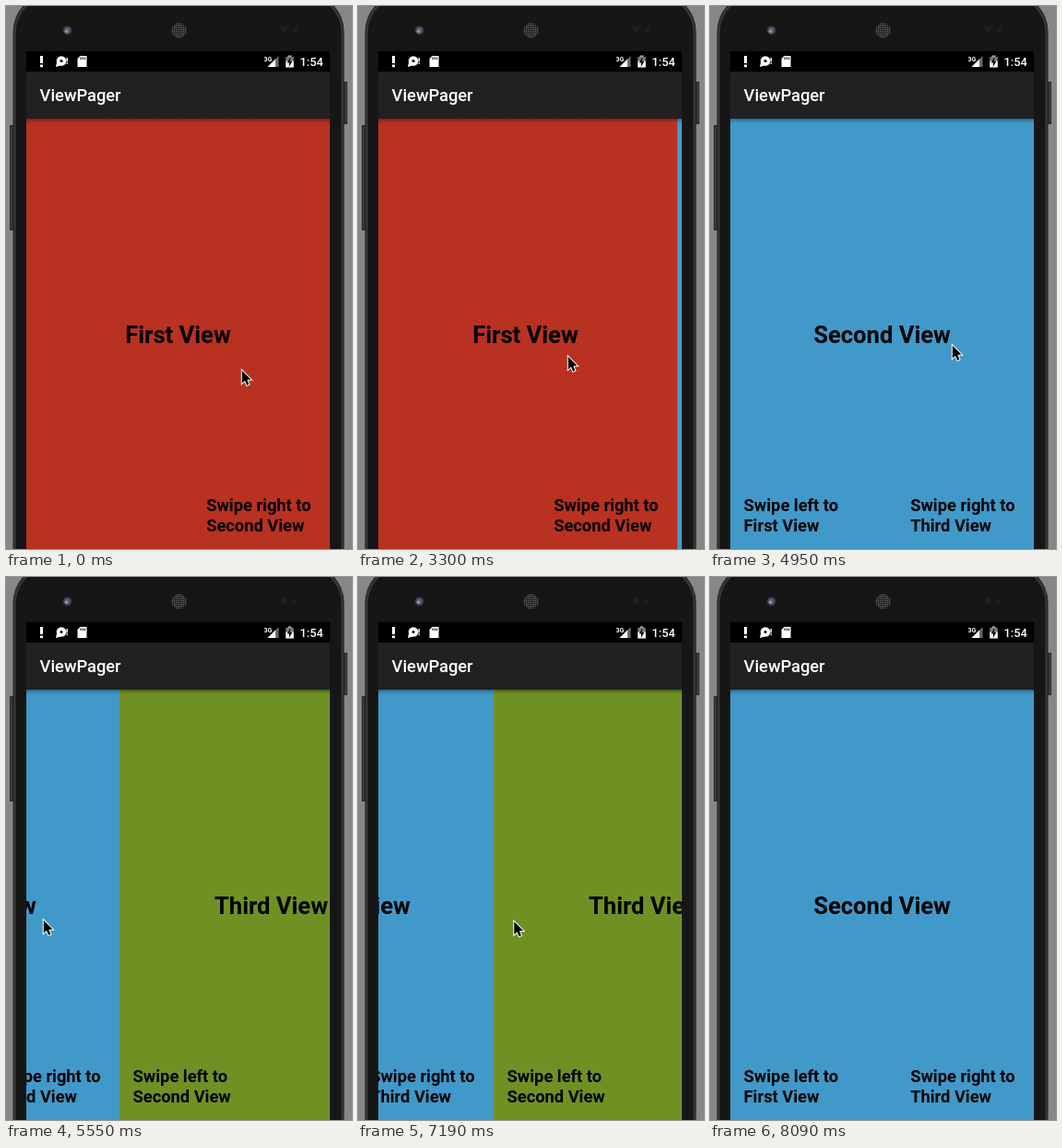
Recreate the animation shown at these times as an HTML page with a canvas. Size 375 by 588 pixels, loop 9.44 s.

```html
<!DOCTYPE html>
<html lang="en">
<head>
<meta charset="utf-8">
<title>ViewPager</title>
<style>
html, body { margin: 0; width: 100%; height: 100%; overflow: hidden; background: #878787; }
canvas { display: block; width: 375px; height: 588px; }
</style>
</head>
<body>
<canvas id="stage"></canvas>
<script>
const W = 375, H = 588, LOOP = 9440;
const SCREEN = { x: 22, y: 49, w: 329, top: 122 };
const canvas = document.getElementById('stage');
const ratio = window.devicePixelRatio || 1;
canvas.width = W * ratio;
canvas.height = H * ratio;
const c = canvas.getContext('2d');
c.scale(ratio, ratio);

const PAGES = [
  { color: '#b93121', title: 'First View', right: 'Second View' },
  { color: '#4199c9', title: 'Second View', left: 'First View', right: 'Third View' },
  { color: '#6f9124', title: 'Third View', left: 'Second View' }
];

// Pager drags, as [time, scroll]
const DRAG_1 = [[3150, 0], [3300, 5], [3624, 80]];
const DRAG_2 = [[4950, 329], [5100, 337], [5550, 557]];
const DRAG_3 = [[6890, 658], [7040, 640], [7397, 386]];

// Visible pointer strokes, as [time, x, y]; each ends at its own "until"
const STROKES = [
  { until: 2250, keys: [[1350, 255, 393], [2100, 70, 403]] },
  { until: 3600, keys: [[2550, 122, 378], [2700, 302, 378], [2850, 240, 378],
                        [3150, 234, 378], [3300, 227, 378], [3600, 157, 378]] },
  { until: 7490, keys: [[4350, 60, 376], [4650, 235, 368], [4800, 235, 368], [4950, 262, 366],
                        [5100, 254, 366], [5550, 40, 370], [6740, 40, 370],
                        [7040, 62, 371], [7340, 275, 372]] }
];

function track(keys, t, k = 1) {
  if (t <= keys[0][0]) return keys[0][k];
  for (let i = 1; i < keys.length; i++) {
    const a = keys[i - 1], b = keys[i];
    if (t <= b[0]) return a[k] + (b[k] - a[k]) * (t - a[0]) / (b[0] - a[0]);
  }
  return keys[keys.length - 1][k];
}

// Quintic deceleration: distance still to travel
function settle(t, start, distance) {
  return distance * Math.pow(Math.max(0, 1 - (t - start) / 955), 5);
}

function scrollAt(t) {
  if (t < 3624) return track(DRAG_1, t);
  if (t < 4950) return 329 - settle(t, 3624, 249);
  if (t < 5720) return track(DRAG_2, t);
  if (t < 6890) return 658 - settle(t, 5720, 101);
  if (t < 7397) return track(DRAG_3, t);
  return 329 + settle(t, 7397, 56.6);
}

function pointerAt(t) {
  if (t < 1500) return [255, 393];
  const s = STROKES.find(s => t >= s.keys[0][0] && t < s.until);
  return s && [track(s.keys, t, 1), track(s.keys, t, 2)];
}

// The picture advances every 150 ms, with one shorter beat before 6440
function beat(t) {
  const base = t < 6440 ? 0 : 6440;
  return base + Math.floor((t - base) / 150) * 150;
}

function rect(x, y, w, h, color) {
  c.fillStyle = color;
  c.fillRect(x, y, w, h);
}

function disc(x, y, r, color) {
  c.fillStyle = color;
  c.beginPath();
  c.arc(x, y, r, 0, Math.PI * 2);
  c.fill();
}

function poly(points, color) {
  c.fillStyle = color;
  c.beginPath();
  points.forEach(([x, y]) => c.lineTo(x, y));
  c.closePath();
  c.fill();
}

function rounded(x, y, w, h, r, color) {
  c.fillStyle = color;
  c.beginPath();
  c.roundRect(x, y, w, h, r);
  c.fill();
}

function text(s, x, y, size, weight = 700, color = '#000', align = 'left') {
  c.font = `${weight} ${size}px Roboto, sans-serif`;
  c.textAlign = align;
  c.fillStyle = color;
  c.fillText(s, x, y);
}

function drawPhone() {
  rect(0, 0, W, H, '#878787');
  rounded(4, 129, 6, 114, 1, '#2b2b2b');
  rect(5, 131, 1, 110, '#484848');
  rounded(364, 82, 6, 46, 1, '#2b2b2b');
  rect(368, 84, 1, 42, '#484848');
  rounded(7.5, -14, 359, 640, 42, '#2a2a2a');
  rounded(9, -12.5, 356, 640, 41, '#3b3b3b');
  rounded(10.5, -11, 353, 640, 40, '#161616');

  disc(66.5, 26.5, 5, '#34343a');
  disc(66.5, 26.5, 3.4, '#565a6c');
  disc(65.5, 27.3, 1.7, '#9296aa');

  disc(187.5, 26.5, 8.2, '#1f1f1f');
  for (let y = -7; y <= 7; y += 2)
    for (let x = -7; x <= 7; x += 2)
      if (x * x + y * y < 60) disc(187.5 + x, 26.5 + y, 0.75, '#5c5c5c');

  disc(301, 25.5, 3.5, '#211e1e');
  disc(313.5, 25.5, 2.5, '#211e1e');
}

function drawBars() {
  rect(SCREEN.x, 49, SCREEN.w, 22, '#000');
  rect(SCREEN.x, 71, SCREEN.w, 51, '#212121');
  text('ViewPager', 36.6, 103, 18.28, 500, '#fff');

  rect(37, 54, 3, 8, '#fff');
  rect(37, 63.5, 3, 2.7, '#fff');

  disc(60, 59.5, 5.3, '#fff');
  poly([[55, 61], [54, 66], [59, 64.5]], '#fff');
  disc(60, 59.5, 1.6, '#000');
  rect(65.5, 56, 1.4, 4.5, '#fff');
  rect(65.5, 61.5, 1.4, 1.5, '#fff');

  poly([[80.5, 54], [87.5, 54], [87.5, 66], [77.5, 66], [77.5, 57]], '#fff');
  [80.5, 82.7, 84.9].forEach(x => rect(x, 55.5, 1, 2.5, '#000'));

  poly([[295.5, 54], [295.5, 66], [283.5, 66]], '#6a6a6a');
  poly([[292, 57.5], [292, 66], [283.5, 66]], '#fff');
  text('3G', 279.5, 59.5, 7, 700, '#fff');

  rect(305.5, 53.5, 4, 2, '#aaa');
  rect(303.2, 55, 8.6, 4.5, '#777');
  rect(303.2, 59.5, 8.6, 7, '#fff');
  poly([[308.3, 55.5], [304.7, 61.5], [307, 61.5], [306.7, 66], [310.3, 60], [308, 60]], '#000');

  text('1:54', 318.5, 65, 12.8, 500, '#fff');
}

function drawHint(x, side, target) {
  text(`Swipe ${side} to`, x, 547, 18.28);
  text(target, x, 568.5, 18.28);
}

function drawPages(scroll) {
  c.save();
  c.beginPath();
  c.rect(SCREEN.x, SCREEN.top, SCREEN.w, H - SCREEN.top);
  c.clip();
  PAGES.forEach((page, i) => {
    const x = SCREEN.x + i * SCREEN.w - scroll;
    if (Math.abs(x - SCREEN.x) >= SCREEN.w) return;
    rect(x, SCREEN.top, SCREEN.w, H - SCREEN.top, page.color);
    text(page.title, x + SCREEN.w / 2, 365, 25.6, 700, '#000', 'center');
    if (page.left) drawHint(x + 14.6, 'left', page.left);
    if (page.right) drawHint(x + 195.2, 'right', page.right);
  });
  const shade = c.createLinearGradient(0, 122, 0, 128);
  shade.addColorStop(0, 'rgba(0,0,0,.34)');
  shade.addColorStop(0.5, 'rgba(0,0,0,.1)');
  shade.addColorStop(1, 'rgba(0,0,0,0)');
  rect(SCREEN.x, SCREEN.top, SCREEN.w, 6, shade);
  c.restore();
}

function drawPointer(x, y) {
  const arrow = [[0.8, 1.8], [0.8, 15.6], [4, 12.7], [6.1, 17.7], [8.4, 16.7], [6.3, 11.8], [10.5, 11.6]];
  c.save();
  c.translate(x, y);
  c.beginPath();
  arrow.forEach(([px, py]) => c.lineTo(px, py));
  c.closePath();
  c.lineWidth = 2;
  c.strokeStyle = '#fff';
  c.stroke();
  c.fillStyle = '#000';
  c.fill();
  c.restore();
}

const begin = performance.now();

function draw() {
  const t = beat((performance.now() - begin) % LOOP);
  drawPhone();
  drawBars();
  drawPages(Math.round(scrollAt(t)));
  const pointer = pointerAt(t);
  if (pointer) drawPointer(...pointer);
  requestAnimationFrame(draw);
}
draw();
</script>
</body>
</html>
```
